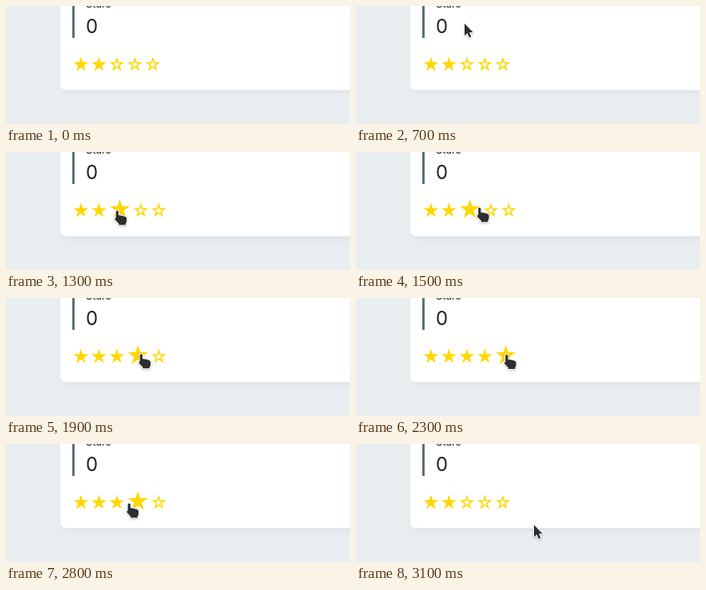
Recreate the animation shown at these times as an HTML page. Size 431 px wide and 148 px high, loop 4.6 s.

```html
<!DOCTYPE html>
<html lang="en">
<head>
<meta charset="utf-8">
<title>Star rating</title>
<style>
  html, body { margin: 0; width: 100%; height: 100%; overflow: hidden; background: #e8edf0; }
  svg { display: block; width: 431px; height: 148px; }
  text { font-family: Inter, "Noto Sans", sans-serif; fill: #212529; }
  .card { fill: #fff; filter: drop-shadow(4px 2px 3px rgba(40, 60, 70, .07)); }
  .cursor path { fill: #2d2d2d; stroke: #fff; stroke-width: 2; paint-order: stroke; stroke-linejoin: round; }
  .cursor { filter: drop-shadow(0 1px 1px rgba(0, 0, 0, .25)); }
</style>
</head>
<body>
<svg viewBox="0 0 431 148">
  <rect class="card" x="68" y="-20" width="400" height="125.5" rx="7"/>
  <rect x="83" width="3" height="40" fill="#5d7078"/>
  <text x="100" y="2" font-size="13">Stars</text>
  <text x="100" y="33.8" font-size="24">0</text>
  <g id="stars"></g>
  <g id="cursor" class="cursor">
    <path id="arrow" d="M0 0V15.2L3.5 12L5.9 17.5L8.3 16.4L6 11.1H10.6Z"/>
    <path id="hand" d="M-1.6 1.6Q-1.6 0 0 0Q1.6 0 1.6 1.6V6.2Q3.6 5.5 4.8 6.7Q6.4 6 7.7 7.3Q9.4 6.8 10.3 8.2Q11.8 8.3 11.8 9.8V13Q11.8 15 10.6 16V18H2V16.5L-2.6 11.6Q-3.4 9.8 -2.2 9.2L-1.6 9.5Z"/>
  </g>
</svg>
<script>
const LOOP = 4600, STEP = 100, ENTER = 700;
const COUNT = 5, RATING = 2, PITCH = 22.5, GROW = 4 / 3;
const ROW = { left: 82.65, top: 55, bottom: 92, baseline: 77.6 };
const RADIUS = 9.9, CENTER_Y = 73.5;
const $ = id => document.getElementById(id);

const entry = { x: 136, y: 22 };
const moves = [
  { from: 700, to: 900, x: 121.8, y: 67.5 },
  { from: 900, to: 1000, x: 124, y: 77 },
  { from: 1100, to: 1500, x: 154.8, y: 69.8 },
  { from: 1600, to: 2300, x: 188.8, y: 71 },
  { from: 2400, to: 2700, x: 152.5, y: 74 },
  { from: 2700, to: 3000, x: 200, y: 85, power: 3 },
  { from: 3000, to: 3100, x: 223, y: 101.5 }
];

function pointerAt(time) {
  let { x, y } = entry;
  for (const move of moves) {
    const k = Math.min(1, Math.max(0, (time - move.from) / (move.to - move.from))) ** (move.power || 1);
    x += (move.x - x) * k;
    y += (move.y - y) * k;
  }
  return { x, y };
}

function layout(hovered) {
  let left = ROW.left;
  return Array.from({ length: COUNT }, (_, i) => {
    const scale = i + 1 === hovered ? GROW : 1;
    const box = { left, right: left + PITCH * scale, scale };
    left = box.right;
    return box;
  });
}

// The grown star shifts its neighbours, so each hover depends on the one before.
function hoveredAt(time) {
  let hovered = 0;
  for (let t = ENTER; t <= time; t += STEP) {
    const { x, y } = pointerAt(t);
    const inRow = y > ROW.top && y < ROW.bottom;
    hovered = inRow ? layout(hovered).findIndex(box => x >= box.left && x < box.right) + 1 : 0;
  }
  return hovered;
}

function starPoints(cx, cy, radius) {
  return Array.from({ length: 10 }, (_, i) => {
    const r = i % 2 ? radius * 0.382 : radius, a = i * Math.PI / 5;
    return `${cx + r * Math.sin(a)},${cy - r * Math.cos(a)}`;
  }).join(" ");
}

function polygon(fill) {
  const el = document.createElementNS("http://www.w3.org/2000/svg", "polygon");
  el.setAttribute("fill", fill);
  return $("stars").appendChild(el);
}

const stars = Array.from({ length: COUNT }, () => ({ body: polygon("#ffd700"), hole: polygon("#fff") }));

function drawStars(hovered) {
  layout(hovered).forEach(({ left, right, scale }, i) => {
    const cx = (left + right) / 2;
    const cy = ROW.baseline + (CENTER_Y - ROW.baseline) * scale;
    const filled = i < (hovered || RATING);
    stars[i].body.setAttribute("points", starPoints(cx, cy, RADIUS * scale));
    stars[i].hole.setAttribute("points", filled ? "" : starPoints(cx, cy, RADIUS * 0.48));
  });
}

function show(id, visible) {
  $(id).style.display = visible ? "" : "none";
}

function draw(now) {
  const time = Math.floor(now % LOOP / STEP) * STEP;
  const hovered = hoveredAt(time);
  const { x, y } = pointerAt(time);
  drawStars(hovered);
  show("cursor", time >= ENTER);
  show("hand", hovered > 0);
  show("arrow", hovered === 0);
  $("cursor").setAttribute("transform", `translate(${x} ${y})`);
}

const start = performance.now();
(function tick() {
  draw(performance.now() - start);
  requestAnimationFrame(tick);
})();
</script>
</body>
</html>
```
